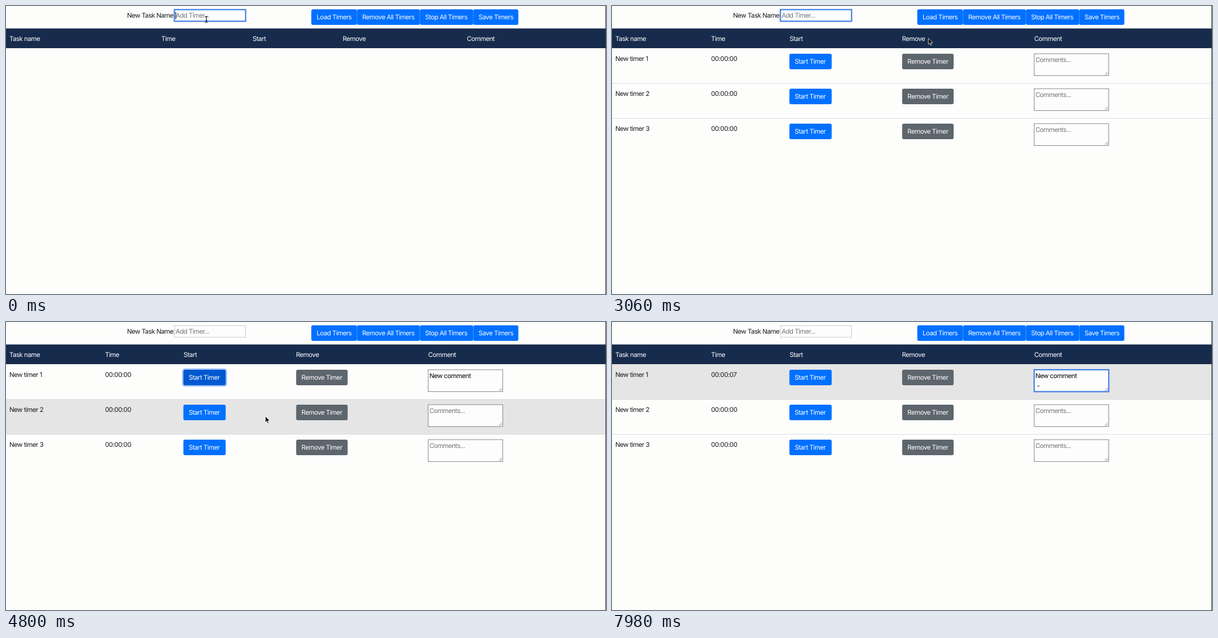
An HTML page for the animation above (8 s loop, 1078 px wide and 519 px high).

```html
<!DOCTYPE html>
<html lang="en">
<head>
<meta charset="utf-8">
<title>Task timers</title>
<style>
  html, body { margin: 0; width: 100%; height: 100%; overflow: hidden; background: #fdfdfc; }
  svg { display: block; width: 1078px; height: 519px; }
  text {
    font: 11.7px Inter, "Open Sans", sans-serif;
    letter-spacing: -0.52px;
    text-rendering: geometricPrecision;
    white-space: pre;
    fill: #16191d;
  }
  .light { fill: #fff; }
  .value { fill: #000; }
  .value.empty { fill: #757575; }
  .primary { fill: #0070ff; }
  .primary.dark { fill: #0058d0; }
  .secondary { fill: #5d656d; }
  .ring { fill: none; stroke: #a3c8fb; stroke-width: 3; }
  .box { fill: #fdfdfd; stroke-width: 1; }
  .box.focus { stroke: #3f7ce6; stroke-width: 2.2; }
  .hidden { visibility: hidden; }
</style>
</head>
<body>
<svg id="stage" viewBox="0 0 1078 519"></svg>
<script>
const LOOP = 8000;
const BLINK = 460;
const HEAD_Y = 76, ROW = 63;
const EMPTY_COLS = [6, 279, 443, 605, 828];
const FULL_COLS = [6, 178, 319, 521, 758.5];

const stage = document.getElementById('stage');

function add(parent, tag, attrs = {}, content = '') {
  const el = document.createElementNS('http://www.w3.org/2000/svg', tag);
  for (const name in attrs) el.setAttribute(name, attrs[name]);
  el.textContent = content;
  return parent.appendChild(el);
}
const rect = (parent, x, y, width, height, attrs) =>
  add(parent, 'rect', { x, y, width, height, ...attrs });
const label = (parent, x, y, content, cls = '') =>
  add(parent, 'text', { x, y, class: cls }, content);
const show = (el, on) => el.classList.toggle('hidden', !on);

function button(parent, x, y, width, content, cls) {
  const ring = rect(parent, x - 1, y - 1, width + 2, 30, { rx: 4, class: 'ring hidden' });
  const face = rect(parent, x, y, width, 28, { rx: 3, class: cls });
  label(parent, x + 9.5, y + 18.4, content, 'light');
  return { face, ring };
}

// Text box with placeholder, up to two lines and a caret.
function field(parent, x, y, width, height, hint, border, textY) {
  const box = rect(parent, x, y, width, height, { class: 'box', stroke: border });
  const lines = [0, 17.5].map(dy => label(parent, x + 2.2, textY + dy, '', 'value'));
  const caret = rect(parent, 0, 0, 1, 13, { fill: '#000' });
  return (value, focused, caretOn) => {
    box.classList.toggle('focus', focused);
    const parts = value.split('\n');
    lines[0].textContent = parts[0] || hint;
    lines[0].classList.toggle('empty', !value);
    lines[1].textContent = parts[1] || '';
    const last = parts.length - 1;
    const end = parts[last] ? lines[last].getComputedTextLength() : 0;
    caret.setAttribute('x', x + 2 + end);
    caret.setAttribute('y', textY + last * 17.5 - 10.5);
    show(caret, focused && caretOn);
  };
}

// Top bar
rect(stage, 0, 0, 1078, 519, { fill: '#fdfdfc' });
label(stage, 217.5, 21.2, 'New Task Name:');
const drawInput = field(stage, 302.5, 6.5, 128, 21, 'Add Timer...', '#cbcbd6', 21.2);
[[548.5, 82, 'Load Timers'], [630.5, 113, 'Remove All Timers'],
 [743.5, 96, 'Stop All Timers'], [839.5, 81, 'Save Timers']]
  .forEach(([x, width, name]) => button(stage, x, 6, width, name, 'primary'));

// Table head
rect(stage, 0, 40.5, 1078, 35.5, { fill: '#172b4d' });
const heads = ['Task name', 'Time', 'Start', 'Remove', 'Comment']
  .map(name => label(stage, 0, 62.8, name, 'light'));

// Table rows
const rows = [0, 1, 2].map(i => {
  const g = add(stage, 'g');
  const y = HEAD_Y + i * ROW;
  const back = rect(g, 0, y, 1078, ROW, { fill: '#e5e5e5' });
  if (i) rect(g, 0, y, 1078, 1, { fill: '#dadde2' });
  label(g, FULL_COLS[0], y + 23.2, 'New timer ' + (i + 1));
  const time = label(g, FULL_COLS[1], y + 23.2, '');
  const start = button(g, 318.7, y + 10, 76, 'Start Timer', 'primary');
  button(g, 521.3, y + 10, 92.5, 'Remove Timer', 'secondary');
  const comment = field(g, 758.5, y + 10, 134, 39.5, 'Comments...', '#85858a', y + 25.4);
  add(g, 'path', { d: `M885.5 ${y + 48}l5.5-5.5m-2.5 5.5l2.5-2.5`, stroke: '#777', 'stroke-width': 0.9 });
  return { g, back, time, start, comment };
});

rect(stage, 1077, 0, 1, 519, { fill: '#3a3a3c' });

// Mouse pointers
const beam = add(stage, 'path', {
  d: 'M-2.5-5.5Q-.4-5.5 0-4.5Q.4-5.5 2.5-5.5M0-4.5V4.5M-2.5 5.5Q-.4 5.5 0 4.5Q.4 5.5 2.5 5.5M-1.5 2H1.5',
  fill: 'none', stroke: '#111', 'stroke-width': 1.1
});
const arrow = add(stage, 'path', {
  d: 'M0 0V11L2.6 8.7L4.3 12.7L6.1 11.9L4.4 8H8Z', fill: '#000', stroke: '#fff', 'stroke-width': 0.8
});
const hand = add(stage, 'path', {
  d: 'M-1 0Q0-1.2 1 0V4L5 5Q6 5.2 6 6.5L5 11H-1L-4 6.5Q-3.6 5-1 7Z', fill: '#fff', stroke: '#000', 'stroke-width': 0.9
});

// Schedules, in milliseconds
const typed = [...'New timer 1\nNew timer 2\nNew timer 3\n'].map((key, i) => [130 + i * 73, key]);
const commented = [...'New comment'].map((key, i) => [3800 + i * 50, key])
  .concat([[5680, '\n'], [7640, ' '], [7720, '-']]);
const focusSteps = [[0, 'input'], [3450, 'comment'], [4640, 'start0'],
  [5480, 'comment'], [6350, 'start1'], [7250, 'comment']];
const path = [[0, 360, 24], [2800, 360, 24], [3380, 850, 104], [4400, 850, 104], [4590, 360, 102],
  [4690, 360, 102], [4800, 466, 170], [4860, 466, 170], [5400, 850, 104], [LOOP, 850, 104]];
const typingSpans = [[130, 2800], [3800, 4380], [5680, LOOP]];
const TIMER_START = 4710, TICK = 430;

const textAt = (keys, t) => keys.filter(k => k[0] <= t).map(k => k[1]).join('');
const ease = p => p * p * (3 - 2 * p);

function mouseAt(t) {
  const i = path.findIndex(p => p[0] > t);
  const [t0, x0, y0] = path[i - 1], [t1, x1, y1] = path[i];
  const p = ease((t - t0) / (t1 - t0));
  return [x0 + (x1 - x0) * p, y0 + (y1 - y0) * p];
}

function drawMouse(t, x, y, row) {
  const visible = !typingSpans.some(([a, b]) => t >= a && t < b);
  const rowY = y - HEAD_Y - row * ROW;
  const inInput = x > 302 && x < 431 && y > 6 && y < 28;
  const inComment = row >= 0 && x > 758 && x < 893 && rowY > 10 && rowY < 50;
  const inButton = row >= 0 && rowY > 10 && rowY < 38 &&
    (x > 319 && x < 395 || x > 521 && x < 614);
  const kind = inInput || inComment ? beam : inButton ? hand : arrow;
  for (const el of [beam, arrow, hand]) {
    el.setAttribute('transform', `translate(${x} ${y})`);
    show(el, visible && el === kind);
  }
  return inButton && x < 395;
}

function draw(t) {
  const entered = textAt(typed, t).split('\n');
  const count = entered.length - 1;
  const [focusTime, focus] = focusSteps.filter(s => s[0] <= t).pop();
  const lastAct = Math.max(focusTime, ...typed.concat(commented).map(k => k[0]).filter(k => k <= t));
  const caretOn = (t - lastAct) % BLINK < BLINK / 2;

  drawInput(entered[count], focus === 'input', caretOn);
  heads.forEach((el, i) => el.setAttribute('x', (count ? FULL_COLS : EMPTY_COLS)[i]));

  const [x, y] = mouseAt(t);
  const hovered = y < HEAD_Y ? -1 : Math.floor((y - HEAD_Y) / ROW);
  const row = hovered < count ? hovered : -1;
  const onStart = drawMouse(t, x, y, row);
  const seconds = Math.max(0, Math.floor((t - TIMER_START) / TICK));

  rows.forEach((r, i) => {
    r.g.style.display = i < count ? '' : 'none';
    if (i >= count) return;
    show(r.back, i === row);
    r.time.textContent = '00:00:0' + (i ? 0 : seconds);
    const active = focus === 'start' + i;
    r.start.face.classList.toggle('dark', active || (onStart && i === row));
    show(r.start.ring, active);
    r.comment(i ? '' : textAt(commented, t), !i && focus === 'comment', caretOn);
  });
}

const origin = performance.now();
function loop() {
  draw((performance.now() - origin) % LOOP);
  requestAnimationFrame(loop);
}
loop();
</script>
</body>
</html>
```
